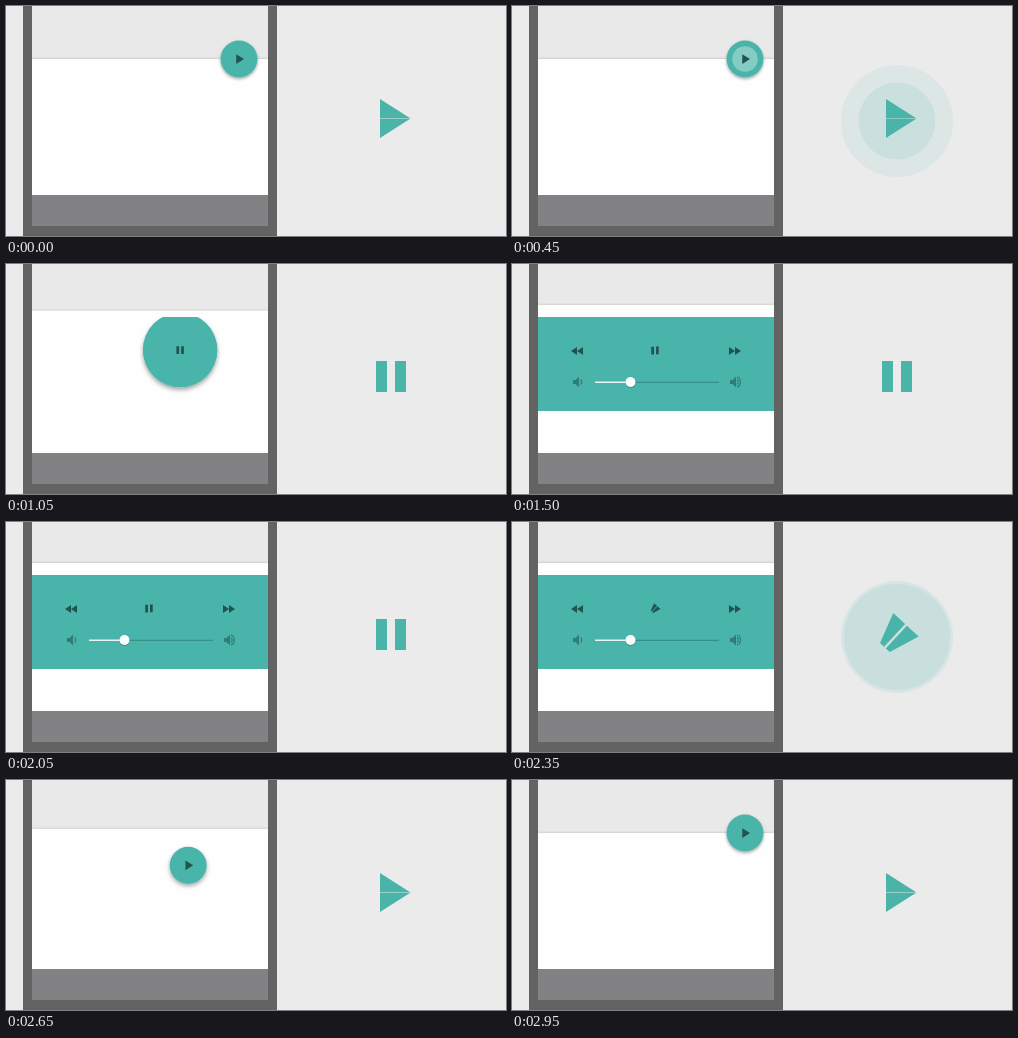
These frames come from a looping animation (500 px wide and 230 px high, 4050 ms). An HTML page:

```html
<!DOCTYPE html>
<html lang="en">
<head>
<meta charset="utf-8">
<title>Play button to player panel</title>
<style>
  html, body { margin: 0; width: 100%; height: 100%; overflow: hidden; background: #ebebeb; }
  svg { display: block; width: 500px; height: 230px; }
</style>
</head>
<body>
<svg viewBox="0 0 500 230">
  <defs>
    <clipPath id="panelClip"><rect id="panelBox" x="26" y="0" width="236" height="147"/></clipPath>
    <clipPath id="screenClip"><rect x="26" y="0" width="236" height="189"/></clipPath>
    <filter id="shadow" filterUnits="userSpaceOnUse" x="0" y="0" width="290" height="230">
      <feDropShadow id="drop" dx="0" dy="1.5" stdDeviation="1.5" flood-color="#000" flood-opacity=".36"/>
    </filter>
    <filter id="edge" filterUnits="userSpaceOnUse" x="0" y="0" width="290" height="230">
      <feDropShadow dx="0" dy="-.3" stdDeviation=".8" flood-color="#000" flood-opacity=".2"/>
    </filter>
    <path id="skip" d="M0 -4L6 0L0 4ZM6 -4L12 0L6 4Z"/>
  </defs>

  <rect width="500" height="230" fill="#ebebeb"/>
  <rect x="17" width="254" height="230" fill="#636363"/>
  <rect x="26" width="236" height="220" fill="#e9e9e9"/>
  <g clip-path="url(#screenClip)">
    <rect id="sheet" x="26" y="53" width="236" height="160" fill="#fefefe" filter="url(#edge)"/>
  </g>
  <rect x="26" y="189" width="236" height="31" fill="#828183"/>

  <g clip-path="url(#panelClip)">
    <g filter="url(#shadow)"><circle id="disc" fill="#4ab4a9"/></g>
    <circle id="glow" fill="#fff"/>
  </g>
  <path id="smallIcon" fill="#22544f"/>

  <g id="controls">
    <g fill="#22544f">
      <use href="#skip" transform="translate(71 87) scale(-1 1)"/>
      <use href="#skip" transform="translate(217 87)"/>
    </g>
    <g fill="#2f7d75">
      <path d="M61 116h2.5l3.5 -3.5v11l-3.5 -3.5h-2.5z"/>
      <path d="M218 116h2.5l3.5 -3.5v11l-3.5 -3.5h-2.5z"/>
    </g>
    <g fill="none" stroke="#2f7d75" stroke-width="1.2">
      <path d="M68.5 115.5q2.6 2.5 0 5"/>
      <path d="M225 115.5q2.6 2.5 0 5"/>
      <path d="M225 113c4.6 1.5 4.6 8.500 0 10"/>
    </g>
    <path d="M118 118.300H207" stroke="#2f8a80"/>
    <path d="M83 118.300H118" stroke="#e8f5f3" stroke-width="1.400"/>
    <circle cx="118.500" cy="118.800" r="5.200" fill="#1d5650" opacity=".3"/>
    <circle cx="118.500" cy="118" r="5" fill="#fff"/>
  </g>

  <g fill="#4ab4a9">
    <circle id="halo" cx="385" cy="115" r="56"/>
    <circle id="wave" cx="385" cy="115"/>
    <path id="bigIcon"/>
  </g>
</svg>
<script>
const LOOP = 4050;
const parts = {};
document.querySelectorAll('[id]').forEach(el => parts[el.id] = el);

const set = (name, attrs) => {
  for (const key in attrs) parts[name].setAttribute(key, attrs[key]);
};
const mix = (a, b, k) => a + (b - a) * k;
const span = (t, start, length) => Math.min(1, Math.max(0, (t - start) / length));

// Standard material curve: cubic-bezier(.4, 0, .2, 1)
function ease(x) {
  let low = 0, high = 1;
  for (let i = 0; i < 20; i++) {
    const u = (low + high) / 2, v = 1 - u;
    if (1.2 * u * v * v + .6 * u * u * v + u * u * u < x) low = u; else high = u;
  }
  return low * low * (3 - 2 * low);
}
const move = (t, start, length) => ease(span(t, start, length));

// Progress that goes out and comes back within one loop
const trip = (t, start, length, backStart, backLength) =>
  move(t, start, length) - move(t, backStart, backLength);

// Two halves that are bars when play = 0 and form a triangle when play = 1
function iconPath(cx, cy, scale, play) {
  const angle = 1.5 * Math.PI * (1 - play);
  const cos = Math.cos(angle), sin = Math.sin(angle);
  const gap = 4 * Math.pow(1 - play, 1.5) - .3 * play;
  const wide = 15 + 4.5 * play;
  const narrow = gap + 11 * (1 - play);
  const shift = 4.5 * play;
  const half = side => [[-15.5, gap], [-15.5, wide], [15.5, narrow], [15.5, gap]]
    .map(([x, y]) => {
      x += shift;
      y *= side;
      return [cx + scale * (x * cos - y * sin), cy + scale * (x * sin + y * cos)]
        .map(n => n.toFixed(2)).join(' ');
    }).join('L');
  return `M${half(-1)}ZM${half(1)}Z`;
}

function ripple(t, start, fadeLength) {
  const age = t - start;
  return {
    size: 1 - Math.pow(1 - span(age, 0, 150), 2),
    halo: span(age, 0, 80) * Math.pow(1 - span(age, 140, fadeLength), 1.5),
    fade: age < 0 ? 0 : Math.pow(1 - span(age, 140, fadeLength), 1.5)
  };
}

function draw(t) {
  const play = 1 - trip(t, 665, 225, 2245, 300);
  const travel = trip(t, 910, 335, 2521, 400);
  const grow = trip(t, 995, 260, 2390, 210);
  const lift = trip(t, 430, 200, 2521, 400);
  const x = mix(233, 143, travel);
  const y = mix(53, 86.5, 1 - Math.pow(1 - travel, 4));
  const radius = mix(18.5, 135, grow);

  set('sheet', { y: mix(53, 41, trip(t, 920, 370, 2480, 400)) });

  const top = grow > .004 ? 53 : 0;
  set('panelBox', { y: top, height: 147 - top });
  set('disc', { cx: x, cy: y, r: radius });
  set('drop', { dy: mix(1.5, 2.5, lift), stdDeviation: mix(1.5, 2.2, lift) });
  set('smallIcon', { d: iconPath(x, y, .25, play) });
  set('controls', { opacity: span(t, 1200, 240) * (1 - span(t, 2350, 80)) });

  const press = ripple(t, 385, 360);
  set('glow', { cx: x, cy: y, r: 18.5 * press.size, opacity: .33 * press.fade });

  const wave = t < 2000 ? press : ripple(t, 2235, 240);
  set('halo', { opacity: .11 * wave.halo });
  set('wave', { r: 56 * wave.size, opacity: .12 * wave.fade });
  set('bigIcon', { d: iconPath(385, 112.5, 1, play) });
}

const began = performance.now();
function tick() {
  draw((performance.now() - began) % LOOP);
  requestAnimationFrame(tick);
}
tick();
</script>
</body>
</html>
```
